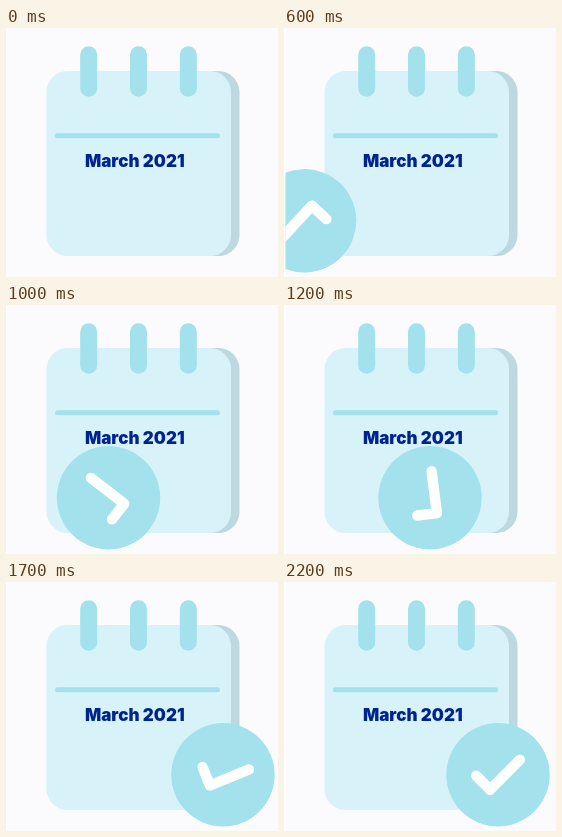
Write an HTML page that moves like this. It is 272x249 px and loops after 3500 ms.

```html
<!DOCTYPE html>
<html lang="en">
<head>
<meta charset="utf-8">
<title>Calendar check</title>
<style>
  html, body { margin: 0; width: 100%; height: 100%; overflow: hidden; background: #fff; }
  svg { display: block; width: 100%; height: 100%; }
  text { font: 900 17px Inter, "Open Sans", sans-serif; fill: #00248f; text-anchor: middle; }
  .ring { stroke: #a3e1ec; stroke-width: 17; stroke-linecap: round; }
</style>
</head>
<body>
<svg viewBox="0 0 272 249">
  <defs>
    <clipPath id="view"><rect x="1.5" width="270.5" height="249"/></clipPath>
  </defs>
  <g clip-path="url(#view)">
    <rect width="272" height="249" fill="#fbfbfd"/>
    <rect x="60" y="43" width="173.5" height="185" rx="21" fill="#bdd9df"/>
    <rect x="40.5" y="43" width="184.5" height="185" rx="21" fill="#d7f2f9"/>
    <path class="ring" d="M82.7 26.7V60.3M132.5 26.7V60.3M182.3 26.7V60.3"/>
    <path d="M51.5 107.7H211.5" stroke="#a3e1ec" stroke-width="5" stroke-linecap="round"/>
    <text x="128.8" y="139.2">March 2021</text>
    <g id="badge">
      <circle r="51.7" fill="#a3e1ec"/>
      <path d="M-21.8 .9L-7.8 14.9L21.9 -15.1" fill="none" stroke="#fff" stroke-width="10.4"
        stroke-linecap="round" stroke-linejoin="round"/>
    </g>
  </g>
</svg>
<script>
  const LOOP = 3500, STEP = 100;
  const badge = document.getElementById('badge');

  // [time, x, angle]: roll in, overshoot, settle
  const keys = [
    [0, -104, -311], [400, -21, -225], [800, 62, -139], [1000, 102.5, -97],
    [1200, 146, -52], [1500, 199, 3], [1900, 223.8, 31], [2200, 214, 0]
  ];

  function slope(i, c) {
    if (i === keys.length - 1) return 0;
    const a = keys[Math.max(i - 1, 0)], b = keys[i + 1], k = keys[i];
    if ((k[c] - a[c]) * (b[c] - k[c]) < 0) return 0;
    return (b[c] - a[c]) / (b[0] - a[0]);
  }

  // Cubic Hermite through the keys
  function sample(t, c) {
    const last = keys.length - 1;
    if (t >= keys[last][0]) return keys[last][c];
    const i = keys.findIndex(k => k[0] > t) - 1;
    const a = keys[i], b = keys[i + 1], d = b[0] - a[0], u = (t - a[0]) / d;
    const v = 1 - u;
    return v * v * ((1 + 2 * u) * a[c] + u * d * slope(i, c))
      + u * u * ((3 - 2 * u) * b[c] - v * d * slope(i + 1, c));
  }

  function draw(ms) {
    const t = Math.floor((ms % LOOP) / STEP) * STEP;
    badge.setAttribute('transform',
      `translate(${sample(t, 1).toFixed(2)} 192.8) rotate(${sample(t, 2).toFixed(2)})`);
  }

  const start = performance.now();
  function tick() {
    draw(performance.now() - start);
    requestAnimationFrame(tick);
  }
  tick();
</script>
</body>
</html>
```
